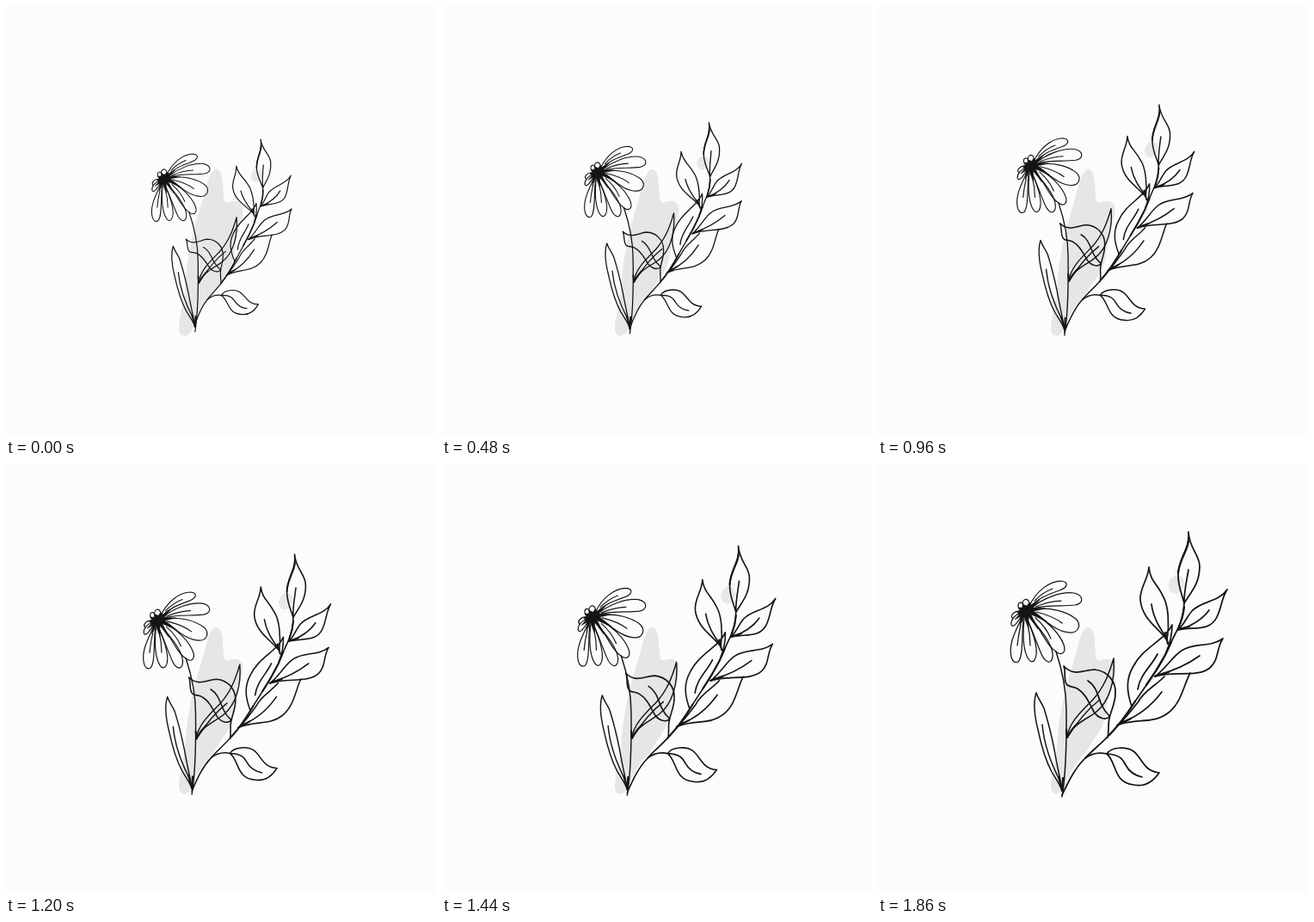
An HTML page that plays this animation: 500 by 500 pixels, repeating every 1890 ms.

```html
<!DOCTYPE html>
<html lang="en">
<head>
<meta charset="utf-8">
<title>Growing flower</title>
<style>
  html, body { margin: 0; width: 100%; height: 100%; overflow: hidden; background: #fcfcfc; }
  svg { display: block; width: 100vw; height: 100vh; }
  .ink { fill: none; stroke: #141414; stroke-linecap: round; stroke-linejoin: round; }
  .bold { stroke-width: 2.2; }
  .fine { stroke-width: 1.25; }
  .solid { fill: #141414; stroke-width: .6; }
</style>
</head>
<body>
<svg viewBox="0 0 500 500">
  <path fill="#e6e6e6" d="M245 190C252 191 252 206 253 221C254 234 261 225 269 227C278 230 276 240 273 251C268 264 267 276 265 290C262 310 250 319 242 335C229 348 222 360 216 376C213 385 202 387 201 376C201 362 207 345 208 330C210 293 218 258 228 228C234 208 236 191 245 190Z"/>

  <g id="branch" class="ink" stroke-width="1.75">
    <ellipse cx="347" cy="140" rx="9" ry="11" fill="#e8e8e8" stroke="none" transform="rotate(25 347 140)"/>
    <!-- stem -->
    <path d="M214 385C222 368 229 354 240 343C249 333 260 325 269 315C280 304 290 290 299 276C306 266 312 257 319 247C325 238 330 230 334 222C339 212 343 202 348 193C353 183 356 173 356 160"/>
    <path class="bold" d="M269 315C280 304 290 290 299 276M312 257C322 243 329 231 334 222C337 216 339 211 341 207M350 189C353 182 355 176 356 166"/>
    <!-- top leaf -->
    <path d="M361 79C363 100 349 108 349 130C349 142 353 150 356 162C363 150 374 140 374 119C374 105 362 99 361 79M356 160C356 147 359 136 361 123"/>
    <path class="bold" d="M361 90C360 101 350 112 349 127"/>
    <!-- upper right leaf -->
    <path d="M406 146C396 161 376 159 365 171C358 179 355 189 348 193C368 189 386 195 394 178C400 166 399 157 406 146M350 193C365 188 377 181 385 170"/>
    <!-- upper left leaf -->
    <path d="M315 120C314 135 304 144 305 158C307 181 327 191 336 205C339 187 338 164 331 153C325 140 316 135 315 120M334 200C328 191 320 179 318 163"/>
    <!-- middle left leaf -->
    <path d="M342 187C334 205 308 213 297 235C288 250 289 264 295 282M342 187C342 198 340 208 335 219M302 262C305 244 318 235 325 221"/>
    <path class="bold" d="M334 196L337 209"/>
    <!-- middle right leaf -->
    <path d="M401 203C386 214 368 207 353 217C342 224 335 238 322 247C345 240 371 249 386 237C397 227 393 215 401 203M326 245C346 240 360 233 374 223"/>
    <!-- lower right leaf -->
    <path d="M333 247C324 257 309 264 303 276C296 285 289 294 280 303C302 295 320 303 338 289C353 277 355 258 363 243M284 300C304 293 318 281 330 265"/>
    <path class="bold" d="M278 304L294 296M322 247L338 242M350 192L362 189"/>
    <!-- low leaf -->
    <path d="M241 342C249 336 258 335 266 337C272 328 290 329 297 334C307 341 308 357 327 359C320 369 310 376 297 373C273 370 278 347 266 337C282 338 285 344 288 350C292 358 298 362 307 364"/>
    <!-- curled leaf -->
    <path d="M216 235C228 248 240 239 252 239C268 241 277 254 276 267C276 278 271 286 269 296C267 303 269 308 267 318M216 235C219 243 215 252 220 257C224 260 228 258 233 262C242 268 245 277 251 288C256 296 265 298 269 294M244 252C255 259 256 272 260 280C263 287 266 290 269 293"/>
  </g>

  <g id="flower" class="ink" stroke-width="1.5">
    <!-- stem -->
    <path d="M207 218C213 236 219 263 219 287C219 313 220 351 214 387"/>
    <path class="bold" d="M215 365L214 380M220 318L219 309"/>
    <!-- stem leaf -->
    <path d="M220 318C221 302 236 288 249 275C263 260 269 243 274 226C276 252 269 276 254 288C243 297 228 301 220 318C229 304 241 287 258 274"/>
    <path class="bold" d="M220 318C224 310 227 306 232 302"/>
    <!-- side leaf -->
    <path d="M184 266C180 278 183 297 186 309C190 328 194 343 202 358C206 365 211 371 214 380C212 366 208 350 205 332C201 312 198 300 193 284C190 277 186 273 184 266M191 303C193 326 202 350 212 369"/>
    <path class="bold" d="M210 364L214 379"/>
    <!-- petals -->
    <g class="fine">
      <path d="M176 165C184 148 199 136 213 136C223 137 220 144 211 147C197 152 186 156 176 167"/>
      <path d="M180 166C192 157 211 148 228 150C240 153 239 162 229 164C214 166 199 163 180 168"/>
      <path d="M179 169C202 166 220 172 230 180C237 187 233 196 224 196C207 196 195 181 178 171"/>
      <path d="M178 173C197 182 211 197 216 210C219 219 214 223 208 219C195 211 190 192 176 176"/>
      <path d="M176 178C190 193 205 213 203 225C201 234 194 230 190 221C184 207 179 192 173 179"/>
      <path d="M173 180C181 197 188 219 182 228C177 234 172 224 170 212C168 200 169 191 170 180"/>
      <path d="M169 181C167 200 169 224 163 230C155 234 152 219 156 205C159 195 163 188 167 179"/>
      <path d="M167 176C162 185 157 191 155 187C154 181 160 175 166 173M164 171C158 171 154 176 156 179"/>
      <path d="M169 165C166 157 175 154 176 162M164 168C160 161 168 158 169 165"/>
      <path d="M183 166Q200 159 213 159M184 172Q204 177 214 185M183 179Q195 189 201 203M174 186Q177 199 177 211M166 187Q163 200 162 211M182 159Q192 149 203 145"/>
    </g>
    <!-- core -->
    <path class="solid" d="M162 172L165 170L163 167L168 167L168 163L173 165L176 161L178 164L188 158L180 167L195 168L181 171L196 183L178 175L186 192L175 177L175 191L170 178L165 188L166 177L159 181L164 175Z"/>
  </g>
</svg>
<script>
  const LOOP = 1890, STEP = 30, LAST = 61;
  const branch = document.getElementById('branch');
  const flower = document.getElementById('flower');

  // Turn and grow a group about a pivot; it reaches its drawn pose at p = 1.
  function grow(group, p, x, y, ratio, turn) {
    const size = (1 + (ratio - 1) * p) / ratio;
    const angle = turn * (p - 1);
    group.setAttribute('transform',
      `translate(${x} ${y}) rotate(${angle}) scale(${size}) translate(${-x} ${-y})`);
  }

  function draw(ms) {
    const step = Math.max(0, Math.floor((ms % LOOP) / STEP) - 1);
    const p = step / LAST;
    grow(branch, p, 220, 345.6, 1.47, 6.13);
    grow(flower, p, 245, 338.7, 1.215, 0.47);
  }

  const start = performance.now();
  function tick() {
    draw(performance.now() - start);
    requestAnimationFrame(tick);
  }
  tick();
</script>
</body>
</html>
```
